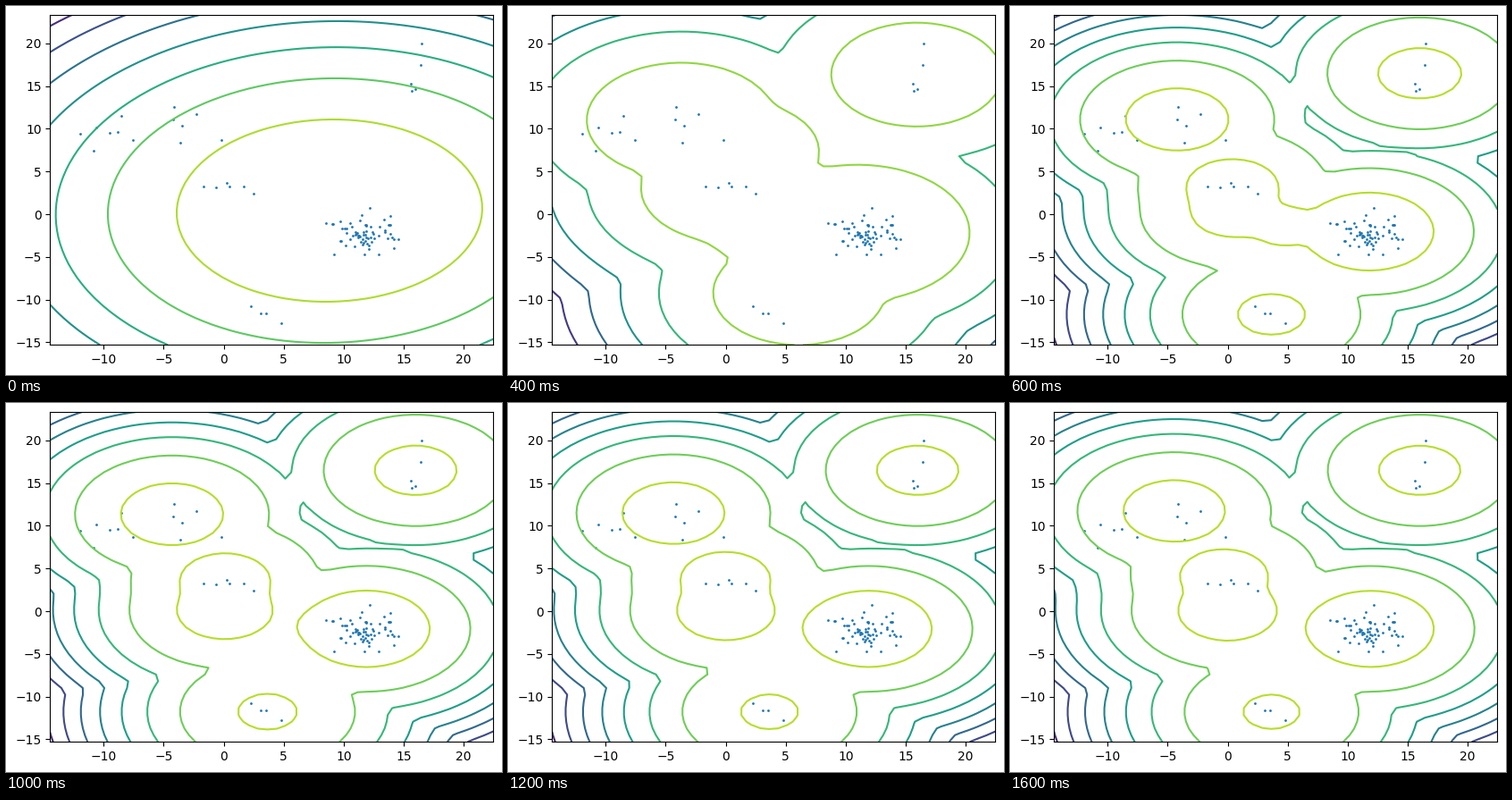
A matplotlib script for the animation above (1.8 s loop, 555 px wide and 413 px high).

```python
import numpy as np
import matplotlib.pyplot as plt
from matplotlib.animation import FuncAnimation

W, H, DPI = 555, 413, 100
LEFT, TOP, AX_W, AX_H = 49.3, 9.7, 496, 369.6
XLIM, YLIM = (-14.46, 22.47), (-15.31, 23.37)
FRAMES, INTERVAL = 9, 200
SPLIT, SETTLE = 2, 3   # frames where the blob has split and where settling starts

# Sample clusters: centre, spread, count.
CLUSTERS = [
    ((16.4, 16.8), (1.6, 2.4), 5),
    ((-4, 10.8), (3.6, 2.6), 13),
    ((0.3, 3.2), (1.6, 0.5), 6),
    ((3.4, -12), (1.8, 0.6), 4),
    ((11.9, -2.1), (1.6, 1.3), 68),
]

# Mixture components as (x, y, squared radius of the top contour):
# pose at the split, pose when settling starts, final pose, ease-out power.
COMPONENTS = [
    ((-3.7, 11, 62), (-4.2, 11.1, 18.4), (-4.45, 11.75, 18), 1),
    ((0.3, 3, 54), (0.4, 3.2, 14.5), (-0.3, 4.15, 13.2), 1),
    ((1, 7.4, 46), (0.4, 3.2, 0), (-0.3, 4.15, 0), 1),
    ((4, -1, 35), (4.8, -1.4, 7.2), (8.5, -1.8, -1), 3),
    ((0.4, 0.4, 0), (0.4, 0.25, 11.6), (0, 0.05, 17), 3),
    ((11, -2.2, 87), (11.8, -2.03, 28.9), (11.93, -2.07, 27.6), 3),
    ((6.1, -9.2, 51), (3.65, -11.73, 8), (3.66, -11.78, 5.6), 3),
    ((15.9, 16.35, 50.5), (16, 16.5, 12.1), (16, 16.5, 11.6), 3),
]

gx, gy = np.meshgrid(np.linspace(*XLIM, 50), np.linspace(*YLIM, 50))


def blob():
    """One wide, slightly tilted Gaussian."""
    dx, dy = gx - 8.82, gy - 0.42
    return (162 - dx**2 - 1.42 * dy**2 + 0.06 * dx * dy) / 179


def mixture(poses, spacing, stretch, sharpness):
    """Log density in level units; zero lies on the top contour."""
    logs = [(r2 - (gx - x)**2 - stretch * (gy - y)**2) / spacing * sharpness
            for x, y, r2 in poses]
    return np.logaddexp.reduce(logs, axis=0) / sharpness


def settled_poses(u):
    for _, start, end, power in COMPONENTS:
        k = 1 - (1 - u)**power
        yield [a + (b - a) * k for a, b in zip(start, end)]


def field(t):
    """Field and number of colour steps at frame t."""
    if t <= SPLIT:
        u = t / SPLIT
        split = mixture([c[0] for c in COMPONENTS], 85, 1.36, 14)
        return blob() * (1 - u) + split * u, 8 - t
    u = (t - SETTLE) / (FRAMES - 1 - SETTLE)
    return mixture(settled_poses(u), 47.2, 1.38, 10), 9


def make_samples(seed=7):
    rng = np.random.default_rng(seed)
    return np.vstack([
        centre + np.clip(rng.normal(size=(count, 2)), -2.2, 2.2) * spread
        for centre, spread, count in CLUSTERS])


fig = plt.figure(figsize=(W / DPI, H / DPI), dpi=DPI, facecolor="white")
ax = fig.add_axes([LEFT / W, 1 - (TOP + AX_H) / H, AX_W / W, AX_H / H])
ax.plot(*make_samples().T, ".", color="tab:blue", ms=2, zorder=1)
ax.set_xticks(range(-10, 21, 5))
ax.set_yticks(range(-15, 21, 5))
contours = []


def draw(frame):
    while contours:
        contours.pop().remove()
    z, count = field(frame)
    contours.append(ax.contour(
        gx, gy, z, levels=np.arange(2 - count, 1), cmap="viridis",
        vmin=1 - count, vmax=1, linewidths=1.5, linestyles="solid", zorder=2))
    ax.set_xlim(XLIM)
    ax.set_ylim(YLIM)
    return []


anim = FuncAnimation(fig, draw, frames=FRAMES, interval=INTERVAL,
                     init_func=lambda: [], repeat=True, repeat_delay=0)
plt.show()
```
